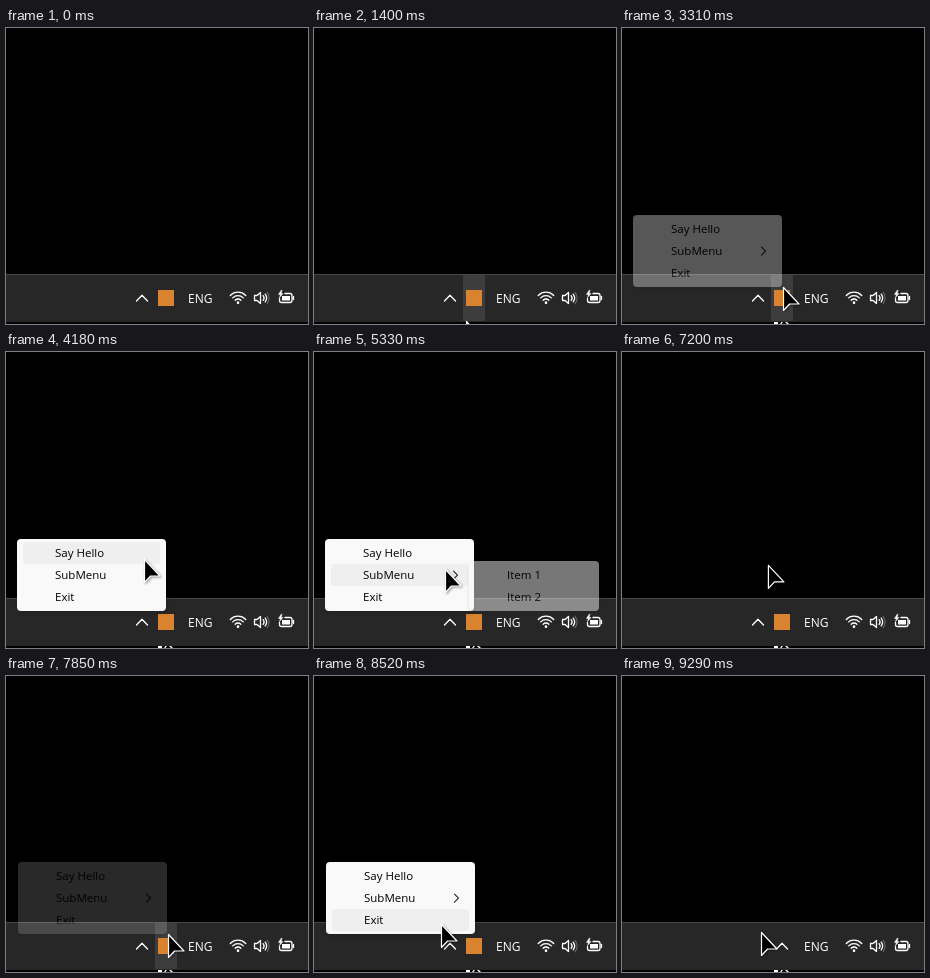
Write an HTML page that moves like this. It is 302 by 296 pixels and loops after 9.52 s.

```html
<!DOCTYPE html>
<html lang="en">
<head>
<meta charset="utf-8">
<title>Tray menu</title>
<style>
  html, body { margin: 0; width: 100%; height: 100%; overflow: hidden; background: #000; }
  svg { display: block; }
  text { font: 500 11.5px "Open Sans", "Noto Sans", sans-serif; fill: #000; }
  .light { fill: #fff; font-size: 12px; }
  .line { fill: none; stroke: #fff; stroke-width: 1.3; stroke-linecap: round; stroke-linejoin: round; }
  .solid { fill: #fff; }
  .panel { fill: #f9f9f9; filter: drop-shadow(0 1px 2px rgba(0, 0, 0, .2)); }
  .row { fill: #efefef; }
  .arrow { stroke: #222; stroke-width: 1.1; }
  #cursor { filter: drop-shadow(1px 1px 1px rgba(0, 0, 0, .4)); }
</style>
</head>
<body>
<svg width="302" height="296" viewBox="0 0 302 296">
  <rect y="246" width="302" height="48" fill="#272727"/>
  <rect y="246" width="302" height="1" fill="#464646"/>
  <rect id="glow" x="149" y="247" width="22" height="46" fill="#3d3d3d"/>

  <path id="chevron" class="line" d="M130.5 273l5.5-5.8l5.5 5.8"/>
  <rect id="icon" x="152" y="262" width="16" height="16" fill="#d9822f"/>
  <text class="light" x="182" y="275">ENG</text>

  <g id="status" class="line">
    <path d="M248.5 267.5h2.5l3.5-3v11l-3.5-3h-2.5z"/>
    <path d="M279 265.5h5a2 2 0 0 1 2 2v5a2 2 0 0 1-2 2h-8.5a2 2 0 0 1-2-2v-2M287.5 268.5v3"/>
    <rect class="solid" x="276" y="268" width="8" height="4.5" stroke="none"/>
    <path class="solid" d="M275 262.5l-2.5 4h2l-1 3l3.5-4h-2l1-3z" stroke-width=".5"/>
  </g>

  <g id="tip">
    <rect x="104.5" y="214.5" width="95" height="24" rx="4" fill="#2c2c2c" stroke="#454545"/>
    <text class="light" x="152" y="231" text-anchor="middle">Hello, World!</text>
  </g>
  <g id="menu"></g>
  <g id="sub"></g>

  <path id="edge" class="solid" d="M152 294h4v2h-4zM158 296l1.5-2h1.5l-1.5 2zM163 294h2l2 2h-2z"/>
  <path id="cursor" d="M.5 .5V23.5L6.6 17H16Z" stroke="#fff" stroke-width="1.2" stroke-linejoin="round"/>
</svg>
<script>
const LOOP = 9520, ROW = 22;
const $ = id => document.getElementById(id);
const [glow, chevron, icon, tip, menu, sub, edge, cursor] =
  ["glow", "chevron", "icon", "tip", "menu", "sub", "edge", "cursor"].map($);

const ramp = (t, a, b) => Math.min(1, Math.max(0, (t - a) / (b - a)));
const smooth = u => u * u * (3 - 2 * u);
const between = (t, a, b) => t >= a && t < b;
const fade = (t, from, to) => ramp(t, from, from + 190) * (1 - ramp(t, to, to + 150));
const show = (part, alpha) => part.setAttribute("opacity", +alpha);
const move = (part, x, y) => part.setAttribute("transform", `translate(${x} ${y})`);

// Arc around (x, y), opening by `half` radians each side of `angle`
function arc(x, y, r, angle, half, color = "#fff") {
  const at = a => `${x + r * Math.cos(a)} ${y + r * Math.sin(a)}`;
  return `<path style="stroke:${color}" d="M${at(angle - half)}A${r} ${r} 0 0 1 ${at(angle + half)}"/>`;
}

function fillPanel(group, x, y, width, labels) {
  group.innerHTML =
    `<rect class="panel" x="${x}" y="${y}" width="${width}" height="${labels.length * ROW + 6}" rx="4"/>` +
    `<rect class="row" x="${x + 6}" width="${width - 12}" height="${ROW}" rx="3"/>` +
    labels.map((label, i) => `<text x="${x + 38}" y="${y + 18 + i * ROW}">${label}</text>`).join("");
}

function highlight(group, y, row, on) {
  const bar = group.querySelector(".row");
  bar.setAttribute("y", y + 3 + row * ROW);
  show(bar, on);
}

let waves = '<circle class="solid" cx="232" cy="274.7" r=".7"/>';
for (let i = 0; i < 3; i++) {
  waves += arc(232, 275, 4 + 3.4 * i, -Math.PI / 2, .8);
  waves += arc(254, 270, 4 + 2.5 * i, 0, .65, i < 2 ? "#fff" : "#666");
}
$("status").insertAdjacentHTML("beforeend", waves);

fillPanel(menu, 11, 187, 149, ["Say Hello", "SubMenu", "Exit"]);
menu.insertAdjacentHTML("beforeend", '<path class="line arrow" d="M139.5 219.2l4 4l-4 4"/>');
fillPanel(sub, 155, 209, 130, ["Item 1", "Item 2"]);

// Pointer moves: start, end, x, y
const moves = [
  [330, 1000, 166, 262], [1000, 1260, 152, 293],  // in over the icon, then below it
  [2280, 2580, 161, 259], [3820, 4180, 138, 207], // icon, Say Hello
  [4880, 5020, 131, 217], [5400, 5860, 213, 224], // SubMenu, Item 1
  [6080, 6280, 137, 188], [7060, 7410, 162, 258], // top edge, icon
  [7980, 8320, 127, 248], [8760, 8960, 139, 256]  // Exit, rest
];

function pointer(t) {
  let x = 26, y = -30;
  for (const [start, end, toX, toY] of moves) {
    const u = smooth(ramp(t, start, end));
    x += (toX - x) * u;
    y += (toY - y) * u;
  }
  return [x, y];
}

function draw(t) {
  const [x, y] = pointer(t);
  move(cursor, x, y);

  show(glow, between(t, 960, 3900) || between(t, 7280, 8060));
  show(tip, fade(t, 1700, 3080));
  show(edge, t >= 1700);

  const shift = t > 7500 ? 1 : 0;
  move(menu, shift, -shift);
  show(menu, fade(t, 3245, 7020) + fade(t, 7820, 8760));
  show(sub, fade(t, 5240, 6490));

  const inSub = x > 160 && between(t, 5400, 6280);
  const row = inSub ? 1 : Math.floor((y - 190) / ROW);
  highlight(menu, 187, row, between(row, 0, 3) && (inSub || x < 160));
  highlight(sub, 209, 0, inSub);

  // On exit the icon leaves and the chevron takes its place
  show(icon, 1 - ramp(t, 8900, 9000));
  move(chevron, 24 * smooth(ramp(t, 8980, 9280)), 0);
}

function tick() {
  draw(performance.now() % LOOP);
  requestAnimationFrame(tick);
}
tick();
</script>
</body>
</html>
```
